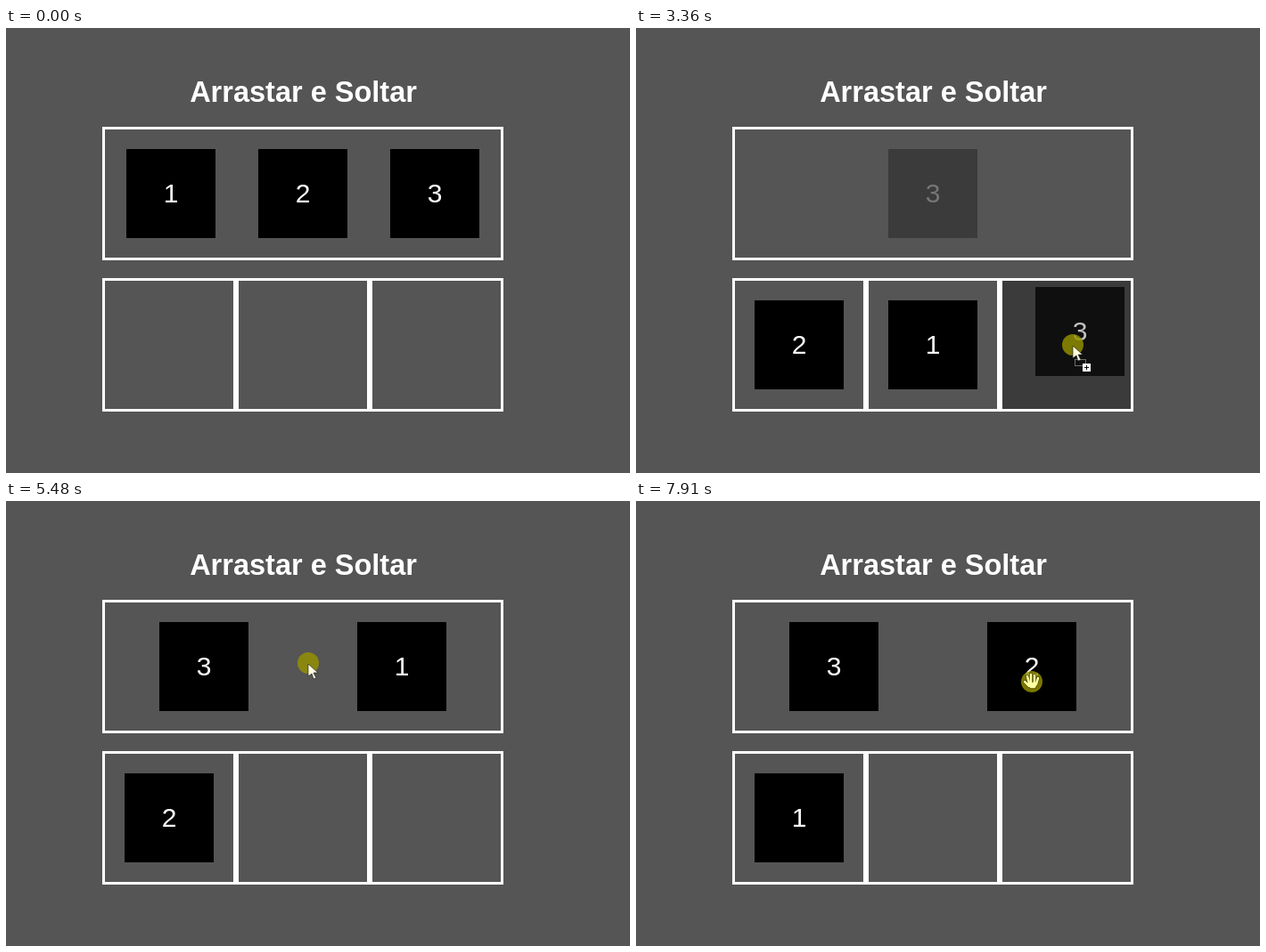
An HTML page with a canvas for the animation above (8 s loop, 700 by 500 pixels).

```html
<!DOCTYPE html>
<html lang="pt">
<head>
<meta charset="utf-8">
<title>Arrastar e Soltar</title>
<style>
html, body { margin: 0; width: 100%; height: 100%; overflow: hidden; background: #555; }
canvas { display: block; }
</style>
</head>
<body>
<canvas id="stage" width="700" height="500"></canvas>
<script>
const ctx = document.getElementById('stage').getContext('2d');
const LOOP = 8000, ENTER = 370, SIZE = 100, TOP = 'top';

// Pointer stops: x, y, arrival and, where it rests, departure
const stops = [
  [622, 494, 370], [178, 211, 1160, 1230], [182, 196, 1530, 1600], [303, 322, 1900, 1950],
  [245, 200, 2230, 2280], [203, 344, 2520, 2640], [325, 201, 2920, 3060],
  [490, 356, 3360, 3600], [470, 406, 3680, 3980], [470, 438, 4070],
  [474, 351, 4270, 4440], [362, 207, 4640, 4740], [333, 354, 5050, 5080],
  [357, 160, 5370, 5430], [200, 345, 5670, 5860], [245, 266, 6030],
  [453, 233, 6380, 6500], [384, 215, 6650], [342, 202, 6820, 6870],
  [235, 272, 7060], [187, 348, 7300, 7520], [390, 264, 7740], [444, 203, 7900, 8000]
];
const path = stops.flatMap(([x, y, ...times]) => times.map(t => ({ t, x, y })));

// Each drag: item, grab time, drop time, destination
const drags = [
  [1, 1610, 1930, 1], [2, 2260, 2620, 0], [3, 3060, 3430, 2], [3, 4450, 4630, TOP],
  [1, 5070, 5420, TOP], [2, 5870, 6380, TOP], [1, 6860, 7520, 0]
];

// Tangent that never overshoots a stop
function slope(i, axis) {
  const after = j => (path[j + 1][axis] - path[j][axis]) / (path[j + 1].t - path[j].t);
  if (i === 0 || i === path.length - 1) return 0;
  const a = after(i - 1), b = after(i);
  return a * b > 0 ? 2 * a * b / (a + b) : 0;
}

function pointer(t) {
  const next = Math.max(1, path.findIndex(key => key.t > t));
  const i = next - 1, p = path[i], q = path[next];
  const span = q.t - p.t, u = (t - p.t) / span, ease = u * u * (3 - 2 * u);
  const along = axis => p[axis] + (q[axis] - p[axis]) * ease
    + span * u * (1 - u) * ((1 - u) * slope(i, axis) - u * slope(next, axis));
  return { x: along('x'), y: along('y') };
}

function stateAt(t) {
  const items = [1, 2, 3].map(id => ({ id, home: TOP }));
  let active = null;
  for (const [id, grab, drop, target] of drags) {
    if (t < grab) break;
    const index = items.findIndex(item => item.id === id);
    if (t < drop) {
      active = { item: items[index], grab };
    } else {
      const [item] = items.splice(index, 1);
      item.home = target;
      items.push(item);
    }
  }
  const row = items.filter(item => item.home === TOP);
  row.forEach((item, i) => {
    item.x = 61 + 444 * (i + .5) / row.length;
    item.y = 136;
  });
  items.filter(item => item.home !== TOP).forEach(item => {
    item.x = 133 + 150 * item.home;
    item.y = 306;
  });
  return { items, active };
}

const inside = (p, x, y, w, h) => p.x >= x && p.x < x + w && p.y >= y && p.y < y + h;

function drawBox(x, y, w, lit) {
  if (lit) {
    ctx.fillStyle = 'rgba(0,0,0,.3)';
    ctx.fillRect(x, y, w, 150);
  }
  ctx.strokeStyle = '#fff';
  ctx.lineWidth = 3;
  ctx.strokeRect(x + 1.5, y + 1.5, w - 3, 147);
}

function drawItem(id, x, y, alpha) {
  ctx.globalAlpha = alpha;
  ctx.fillStyle = '#000';
  ctx.fillRect(x, y, SIZE, SIZE);
  ctx.fillStyle = '#fff';
  ctx.font = '30px "Liberation Sans", Arial, sans-serif';
  ctx.fillText(id, x + 50, y + 60);
  ctx.globalAlpha = 1;
}

function drawHand() {
  const shape = new Path2D('M-5-6L-3 2M-1-8V1M3-7V1M7-4L5 3M-8 0L-3 5M-3 2H5L3 6H-1Z');
  ctx.lineCap = ctx.lineJoin = 'round';
  ctx.strokeStyle = '#4d4b00';
  ctx.lineWidth = 4;
  ctx.stroke(shape);
  ctx.strokeStyle = ctx.fillStyle = '#ffffa0';
  ctx.lineWidth = 2.5;
  ctx.stroke(shape);
  ctx.fill(shape);
}

function drawArrow() {
  const shape = new Path2D('M0 1V15L4 12L6 18L9 17L6 11H11Z');
  ctx.fillStyle = '#ffffe0';
  ctx.fill(shape);
  ctx.strokeStyle = '#222';
  ctx.lineWidth = .7;
  ctx.stroke(shape);
}

function drawDragBadge() {
  ctx.strokeStyle = '#ccc';
  ctx.lineWidth = 1;
  ctx.setLineDash([1, 1]);
  ctx.strokeRect(2.5, 16.5, 12, 7);
  ctx.fillStyle = '#fff';
  ctx.fillRect(11, 21, 9, 9);
  ctx.fillStyle = '#000';
  ctx.fillRect(13, 25, 5, 1);
  ctx.fillRect(15, 23, 1, 5);
}

function drawPointer(p, hand, dragging) {
  ctx.save();
  ctx.translate(Math.round(p.x), Math.round(p.y));
  ctx.fillStyle = 'rgba(150,146,0,.82)';
  ctx.beginPath();
  ctx.arc(0, 0, 12, 0, 2 * Math.PI);
  ctx.fill();
  if (hand) drawHand();
  else drawArrow();
  if (dragging) drawDragBadge();
  ctx.restore();
}

function draw(t) {
  const { items, active } = stateAt(t);
  const p = pointer(Math.max(t, ENTER));
  const lit = (name, x, y, w) =>
    active && active.item.home !== name && inside(p, x, y, w, 150);

  ctx.fillStyle = '#555';
  ctx.fillRect(0, 0, 700, 500);
  ctx.textAlign = 'center';
  ctx.fillStyle = '#fff';
  ctx.font = 'bold 32.5px "Liberation Sans", Arial, sans-serif';
  ctx.fillText('Arrastar e Soltar', 333.5, 83);

  drawBox(108, 111, 450, lit(TOP, 108, 111, 450));
  for (let i = 0; i < 3; i++) {
    const x = 108 + 150 * i;
    drawBox(x, 281, 150, lit(i, x, 281, 150));
  }
  for (const item of items) {
    drawItem(item.id, item.x, item.y, active && item === active.item ? .3 : 1);
  }
  if (active) {
    const from = pointer(active.grab), { id, x, y } = active.item;
    drawItem(id, Math.round(x + p.x - from.x), Math.round(y + p.y - from.y), .75);
  }
  if (t >= ENTER) {
    const hover = items.some(item => inside(p, item.x, item.y, SIZE, SIZE));
    drawPointer(p, hover && !active, active);
  }
}

const start = performance.now();
function frame() {
  draw((performance.now() - start) % LOOP);
  requestAnimationFrame(frame);
}
frame();
</script>
</body>
</html>
```
